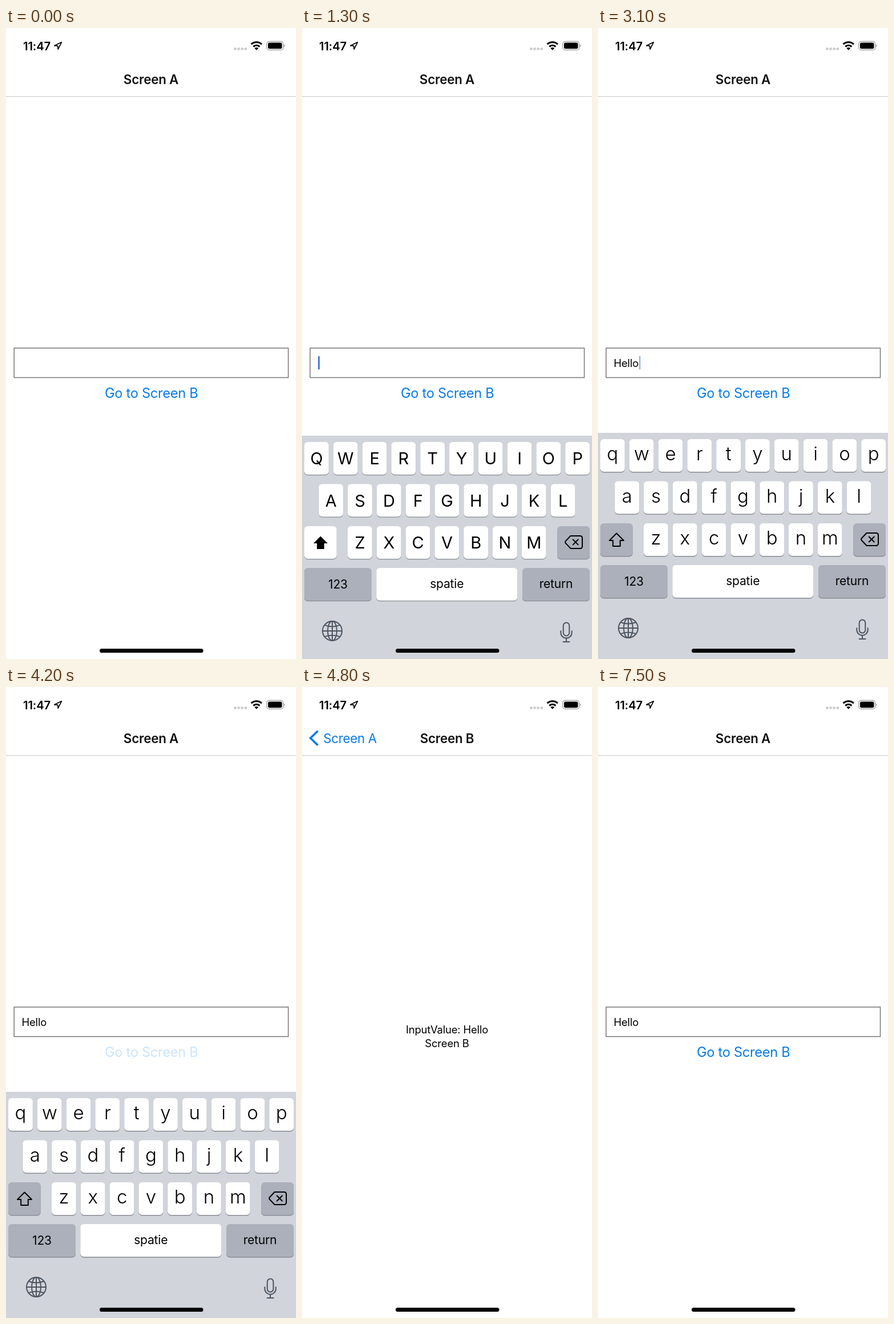
An HTML page that plays this animation: 508x1102 px, repeating every 7.6 s.

```html
<!DOCTYPE html>
<html lang="en">
<head>
<meta charset="utf-8">
<title>Screen navigation</title>
<style>
  html, body { margin: 0; width: 100%; height: 100%; overflow: hidden; background: #fff; }
  svg { display: block; width: 100%; height: 100%; }
  text { font-family: Inter, Roboto, sans-serif; font-size: 18.4px; letter-spacing: -.008em; white-space: pre; }
  .mid { text-anchor: middle; }
  .title { font-size: 22.3px; font-weight: 600; fill: #111; }
  .blue { fill: #067bea; }
  .upper { font-size: 29px; }
  .lower { font-size: 33px; font-weight: 300; }
  .label { font-size: 21px; }
  .line { fill: none; stroke: #000; stroke-width: 2; stroke-linejoin: round; stroke-linecap: round; }
  .tool { stroke: #4d5560; }
</style>
</head>
<body>
<svg viewBox="0 0 508 1102">
  <defs>
    <linearGradient id="shade">
      <stop offset="0" stop-opacity="0"/>
      <stop offset=".5" stop-opacity=".06"/>
      <stop offset="1" stop-opacity=".24"/>
    </linearGradient>
  </defs>

  <g id="screenA">
    <rect x="14.2" y="559" width="480.3" height="51.5" fill="#fff" stroke="#777" stroke-width="1.5"/>
    <text id="input" x="27.5" y="591.5"></text>
    <rect id="caret" y="573" width="2.7" height="23.5" rx="1" fill="#426bd6"/>
    <text id="link" class="mid blue" x="254.7" y="646" style="font-size:23.6px;letter-spacing:-.012em">Go to Screen B</text>
  </g>

  <g id="screenB">
    <rect x="-18" y="119" width="18" height="983" fill="url(#shade)"/>
    <rect y="119" width="508" height="983" fill="#fff"/>
    <text class="mid" x="254" y="605">InputValue: Hello</text>
    <text class="mid" x="254" y="629">Screen B</text>
  </g>

  <rect width="508" height="119" fill="#fff"/>
  <rect y="119" width="508" height="1.2" fill="#cfcfcf"/>
  <text id="titleA" class="mid title" x="254" y="97.5">Screen A</text>
  <text id="titleB" class="mid title" x="254" y="97.5">Screen B</text>
  <g id="back">
    <path d="M27.8 76.8L14.8 89.3L27.8 101.8" fill="none" stroke="#067bea" stroke-width="3.6"/>
    <text class="blue" x="37.2" y="97.5" style="font-size:22.3px;letter-spacing:-.012em">Screen A</text>
  </g>

  <text class="mid" x="54" y="38.5" style="font-size:20.3px;font-weight:600">11:47</text>
  <path class="line" d="M97.3 24.8L84.8 30.8L90.6 31.3L91.2 37.2Z" style="stroke-width:1.7"/>
  <g fill="#ccc">
    <circle cx="401.5" cy="36.5" r="2.4"/><circle cx="407.6" cy="36.5" r="2.4"/>
    <circle cx="413.7" cy="36.5" r="2.4"/><circle cx="419.8" cy="36.5" r="2.4"/>
  </g>
  <path d="M429.7 28.4a12.9 12.9 0 0 1 18.2 0M433.3 32.6a7.8 7.8 0 0 1 11 0" fill="none" stroke="#000" stroke-width="3"/>
  <path d="M438.8 38.8l-3.4-3.5a4.8 4.8 0 0 1 6.8 0z"/>
  <rect x="456.8" y="23.4" width="28.8" height="15" rx="4.4" fill="none" stroke="#999" stroke-width="1.3"/>
  <rect x="459" y="25.6" width="24.4" height="10.6" rx="2.6"/>
  <path d="M487.2 28.4q3.2 2.5 0 5z" fill="#999"/>

  <g id="keyboard"></g>
  <rect x="164" y="1084" width="181.5" height="7" rx="3.5"/>
</svg>

<script>
const LOOP = 7600, STEP = 100, KEYBOARD_HEIGHT = 395;
const el = id => document.getElementById(id);

// Keyboard, drawn from its own top edge
const rows = [['qwertyuiop', 4, 11], ['asdfghjkl', 29.3, 84.5], ['zxcvbnm', 80, 158]];

const key = (x, y, w, fill = '#fff') =>
  `<rect x="${x}" y="${y + 1.4}" width="${w}" height="57" rx="6" fill="#898c92"/>
   <rect x="${x}" y="${y}" width="${w}" height="57" rx="6" fill="${fill}"/>`;

const label = (text, x, y, style) => `<text class="mid ${style}" x="${x}" y="${y}">${text}</text>`;

const eachKey = draw => rows.map(([letters, x, y]) =>
  [...letters].map((c, i) => draw(c, x + i * 50.8, y)).join('')).join('');

const grey = '#abb0bb';
const arrow = 'M32.5 175.5L45 188H38.8V198H26.2V188H20Z';

el('keyboard').innerHTML = `
  <rect width="508" height="${KEYBOARD_HEIGHT}" fill="#d1d4db"/>
  ${eachKey((c, x, y) => key(x, y, 42.8))}
  ${key(447.3, 158, 56.7, grey)}
  ${key(4, 231, 118, grey)}${key(130.3, 231, 247, '#fff')}${key(386, 231, 118, grey)}
  ${label('123', 63, 267, 'label')}${label('spatie', 253.7, 266, 'label')}${label('return', 445, 266, 'label')}
  <g id="capitals">
    ${eachKey((c, x, y) => label(c.toUpperCase(), x + 21.4, y + 39.5, 'upper'))}
    ${key(4, 158, 56.7)}<path d="${arrow}"/>
  </g>
  <g id="smalls">
    ${eachKey((c, x, y) => label(c, x + 21.4, y + 37, 'lower'))}
    ${key(4, 158, 56.7, grey)}<path class="line" d="${arrow}"/>
  </g>
  <path class="line" d="M470.5 175H487q4 0 4 4V193q0 4-4 4H470.5L461.5 187.5Q460.7 186 461.5 184.5ZM474.7 181.5l9 9m0-9l-9 9"/>
  <g class="line tool">
    <circle cx="53" cy="341" r="17"/><ellipse cx="53" cy="341" rx="8" ry="17"/>
    <path d="M53 324V358M36 341H70M40 331Q53 336 66 331M40 351Q53 346 66 351"/>
    <rect x="457.7" y="326.5" width="10.6" height="23" rx="5.3"/>
    <path d="M453.3 341v3a9.7 9.7 0 0 0 19.4 0v-3M463 354V360M457.5 360H468.5"/>
  </g>`;

// Critically damped spring from 0 to 1, settled after half a second
const spring = ms => {
  if (ms <= 0) return 0;
  if (ms >= 500) return 1;
  const x = ms * 0.01826;
  return 1 - (1 + x) * Math.exp(-x);
};

// Linear interpolation through [time, value] points
const track = (t, points) => {
  const i = points.findIndex(p => p[0] > t);
  if (i === 0) return points[0][1];
  if (i < 0) return points[points.length - 1][1];
  const [t0, v0] = points[i - 1], [t1, v1] = points[i];
  return v0 + (v1 - v0) * (t - t0) / (t1 - t0);
};

const caretFade = [[899, 0], [900, 1], [1400, 1], [1600, 0], [1699, 0], [1700, 1], [2800, 1], [3000, 0],
  [3200, 1], [3400, 1], [3600, 0], [3800, 0], [4000, 1], [4200, 0]];
const linkFade = [[3850, 1], [4050, .2], [4250, .2], [4500, 1]];
const backFade = [[6780, 1], [6950, .2], [7000, .2], [7250, 1]];
const typing = [[2400, 'Hello'], [2100, 'Hel'], [1800, 'He'], [1700, 'H'], [0, '']];

const move = (id, x, y) => el(id).setAttribute('transform', `translate(${x} ${y})`);
const fade = (id, opacity) => el(id).setAttribute('opacity', opacity);
const show = (id, on) => el(id).setAttribute('display', on ? 'inline' : 'none');

function render(t) {
  const push = spring(t - 4245) - spring(t - 6960);
  const raised = spring(t - 950) - spring(t - 4241);

  move('screenA', -152.4 * push, 0);
  move('screenB', 508 * (1 - push), 0);
  show('screenB', push > 0);
  fade('titleA', Math.max(0, 1 - 1.1 * push));
  fade('titleB', push ** 4);
  fade('back', push ** 4 * track(t, backFade));

  el('input').textContent = typing.find(([from]) => t >= from)[1];
  el('caret').setAttribute('x', 28.2 + el('input').getComputedTextLength());
  fade('caret', track(t, caretFade));
  fade('link', track(t, linkFade));

  move('keyboard', 0, 1102 - KEYBOARD_HEIGHT * raised);
  show('keyboard', raised > 0);
  show('capitals', t < 1700);
  show('smalls', t >= 1700);
}

function tick() {
  const t = performance.now() % LOOP;
  render(Math.floor(t / STEP) * STEP);
  requestAnimationFrame(tick);
}
tick();
</script>
</body>
</html>
```
